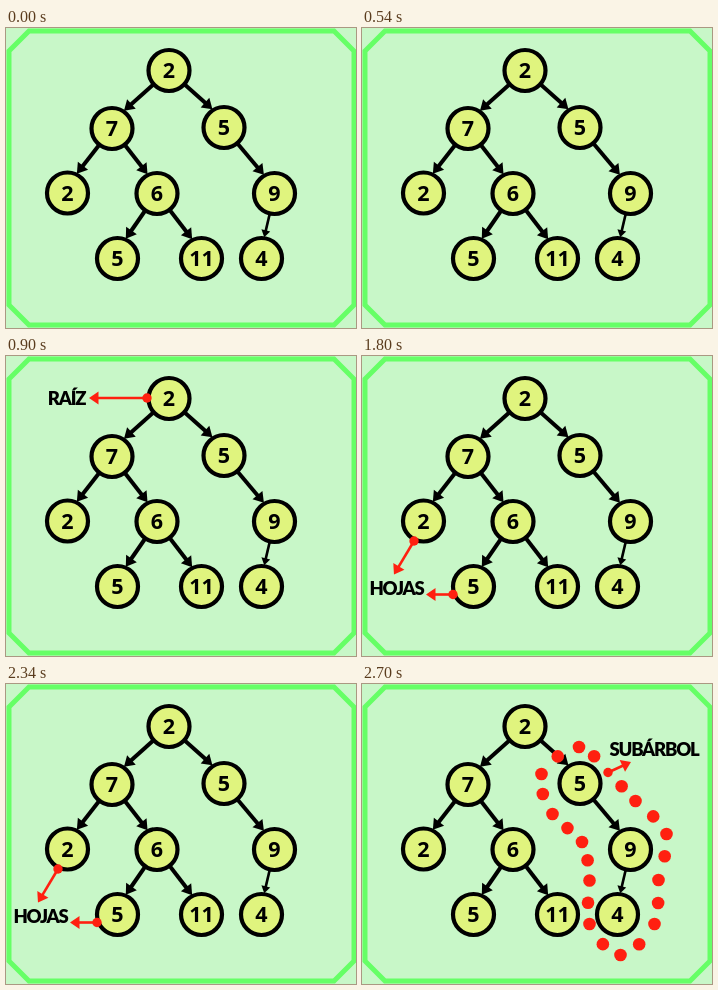
These frames come from a looping animation (350x300 px, 3600 ms). An HTML page:

```html
<!DOCTYPE html>
<html lang="es">
<head>
<meta charset="utf-8">
<title>Árbol binario</title>
<style>
  html, body { margin: 0; width: 100%; height: 100%; overflow: hidden; background: #c8f7c8; }
  svg { display: block; width: 350px; height: 300px; }
  text { text-anchor: middle; }
  .frame { fill: none; stroke: #66ff66; stroke-width: 5; }
  .edge { stroke: #000; stroke-width: 4; }
  .edge.thin { stroke-width: 2.6; }
  .node circle { fill: #e0f47e; stroke: #000; stroke-width: 4.2; }
  .node text { font: 700 21.5px "Open Sans", "Noto Sans", sans-serif; }
  .note { visibility: hidden; fill: #ff2010; animation: show 3600ms step-end infinite; }
  .note line { stroke: #ff2010; stroke-width: 2.6; }
  .note text { fill: #000; font: 900 18.5px Lato, sans-serif; letter-spacing: -1.2px; }
  #root { animation-delay: -2700ms; }
  #leaves { animation-delay: -1800ms; }
  #subtree { animation-delay: -900ms; }
  @keyframes show {
    0% { visibility: visible; }
    25%, 100% { visibility: hidden; }
  }
</style>
</head>
<body>
<svg viewBox="0 0 350 300">
  <path class="frame" d="M23 3H328L348 23V277L328 297H23L3 277V23Z"/>
  <g id="edges"></g>
  <g id="nodes"></g>
  <g id="root" class="note"><text x="60.5" y="49">RAÍZ</text></g>
  <g id="leaves" class="note"><text x="34.5" y="238.5">HOJAS</text></g>
  <g id="subtree" class="note"><text x="292" y="72">SUBÁRBOL</text></g>
</svg>
<script>
  const $ = id => document.getElementById(id);

  function add(parent, tag, attrs, text) {
    const el = document.createElementNS(parent.namespaceURI, tag);
    for (const key in attrs) el.setAttribute(key, attrs[key]);
    if (text !== undefined) el.textContent = text;
    return parent.appendChild(el);
  }

  function arrow(parent, [x1, y1], [x2, y2], len, half, cls = '') {
    const d = Math.hypot(x2 - x1, y2 - y1);
    const ux = (x2 - x1) / d, uy = (y2 - y1) / d;
    const bx = x2 - ux * len, by = y2 - uy * len;
    add(parent, 'line', { x1, y1, x2: bx + ux, y2: by + uy, class: cls });
    add(parent, 'path', {
      d: `M${x2} ${y2}L${bx - uy * half} ${by + ux * half}L${bx + uy * half} ${by - ux * half}Z`
    });
  }

  function pointer(parent, from, to) {
    arrow(parent, from, to, 9.5, 6.5);
    add(parent, 'circle', { cx: from[0], cy: from[1], r: 4.7 });
  }

  // Edges start at the parent's centre and touch the child's upper rim
  function drawTree({ label, at: [x, y], kids = [] }) {
    for (const kid of kids) {
      const [kx, ky] = kid.at;
      const dx = (kx - x) * 0.21;
      const tip = [kx - dx, ky - Math.sqrt(21.5 ** 2 - dx ** 2)];
      if (kid.thin) arrow($('edges'), [x, y], tip, 7, 4.5, 'edge thin');
      else arrow($('edges'), [x, y], tip, 10, 6.5, 'edge');
      drawTree(kid);
    }
    const g = add($('nodes'), 'g', { class: 'node', transform: `translate(${x} ${y})` });
    add(g, 'circle', { r: 20.5 });
    add(g, 'text', { y: 7.6 }, label);
  }

  drawTree({ label: 2, at: [163, 42.5], kids: [
    { label: 7, at: [106, 100.5], kids: [
      { label: 2, at: [61.5, 165] },
      { label: 6, at: [151, 165.5], kids: [
        { label: 5, at: [111.5, 230.5] },
        { label: 11, at: [195.5, 230.5] }
      ] }
    ] },
    { label: 5, at: [218, 99.5], kids: [
      { label: 9, at: [268.5, 165.5], kids: [
        { label: 4, at: [255.5, 230.5], thin: true }
      ] }
    ] }
  ] });

  pointer($('root'), [141, 42], [83, 42]);
  pointer($('leaves'), [52, 185], [32, 218.5]);
  pointer($('leaves'), [91, 238.5], [64, 238.5]);
  pointer($('subtree'), [246, 88.5], [269, 78]);

  // Dotted loop: a dot on each key point and one halfway along the spline to the next
  const loop = [
    [217, 63], [246, 88.5], [273.5, 117], [304.5, 150], [296.5, 196], [292.5, 240],
    [258.5, 271], [227.5, 240], [227.5, 196.5], [220, 158], [190.5, 130], [179.5, 90]
  ];
  const key = i => loop[(i + loop.length) % loop.length];
  const dot = ([cx, cy]) => add($('subtree'), 'circle', { cx, cy, r: 6.3 });

  loop.forEach((p, i) => {
    if (i !== 1) dot(p); // the pointer starts here
    const [a, b, c] = [key(i - 1), key(i + 1), key(i + 2)];
    dot([0, 1].map(k => (9 * (p[k] + b[k]) - a[k] - c[k]) / 16));
  });
</script>
</body>
</html>
```
